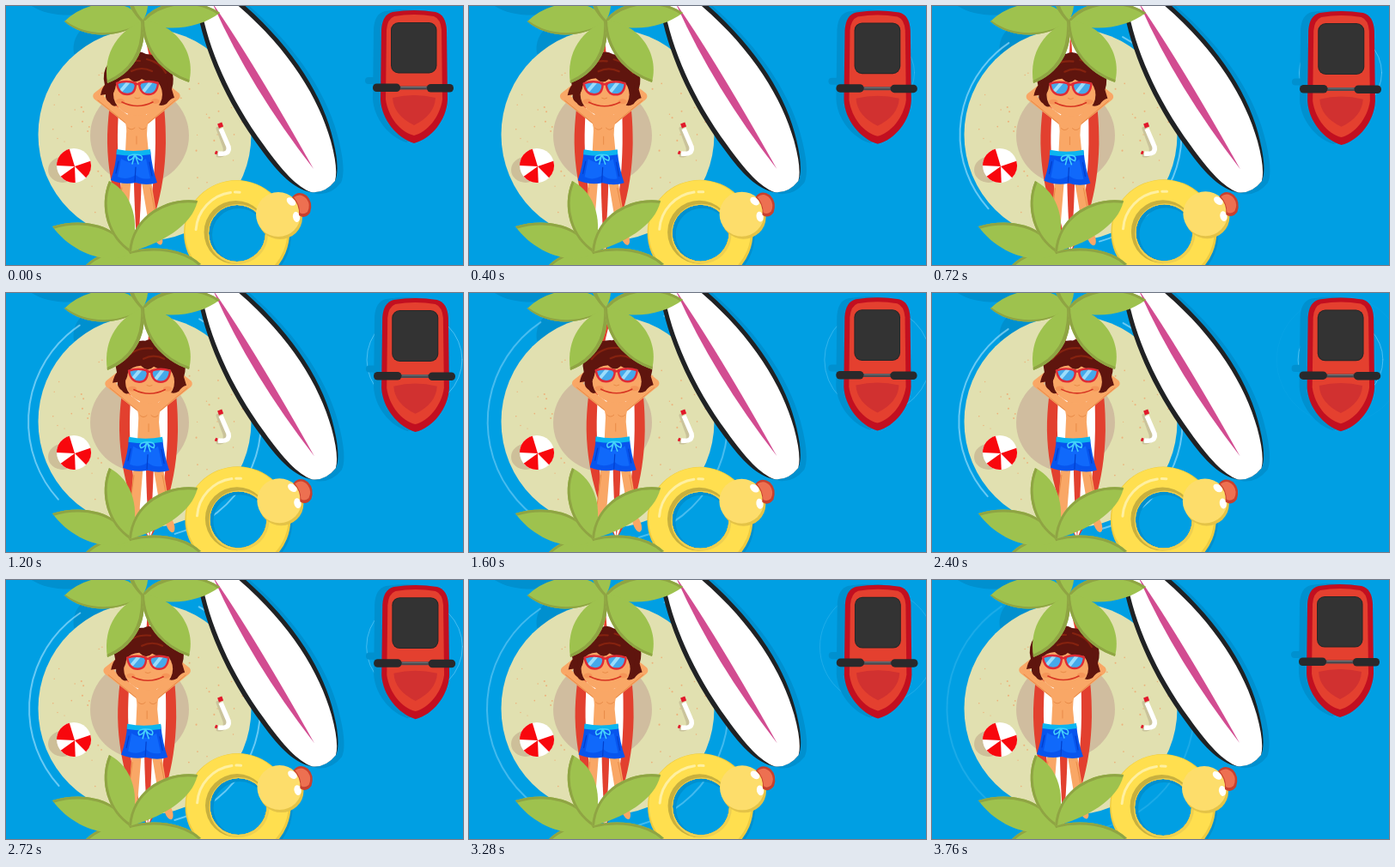
These frames come from a looping animation (532x302 px, 3.84 s). An HTML page with a canvas:

```html
<!DOCTYPE html>
<html lang="en">
<head>
<meta charset="utf-8">
<title>Beach island</title>
<style>
html, body { margin: 0; width: 100%; height: 100%; overflow: hidden; background: #009fe3; }
canvas { display: block; }
</style>
</head>
<body>
<canvas id="stage" width="532" height="302"></canvas>
<script>
const ctx = document.getElementById('stage').getContext('2d');
const LOOP = 3840, STEP = 80, RAD = Math.PI / 180;
const WATER = '#009fe3', SHADE = '#0090cf', SKIN = '#f9a766', SKIN_DARK = '#e88b48';
const LEAF = '#9ec24e', LEAF_DARK = '#8fa443';
const HAIR = '#5f150e', HAIR_LIGHT = '#85220f';
const clamp = v => Math.max(0, Math.min(1, v));

function shape(d, color) {
  ctx.fillStyle = color;
  ctx.fill(new Path2D(d));
}
function line(d, color, width, cap = 'round') {
  ctx.strokeStyle = color;
  ctx.lineWidth = width;
  ctx.lineCap = cap;
  ctx.lineJoin = 'round';
  ctx.stroke(new Path2D(d));
}
function oval(x, y, rx, ry, color, turn = 0) {
  ctx.fillStyle = color;
  ctx.beginPath();
  ctx.ellipse(x, y, rx, ry, turn, 0, 7);
  ctx.fill();
}
const disc = (x, y, r, color) => oval(x, y, r, r, color);
function box(x, y, w, h, r, color) {
  ctx.fillStyle = color;
  ctx.beginPath();
  ctx.roundRect(x, y, w, h, r);
  ctx.fill();
}
function arc(x, y, r, from, to, color, width) {
  ctx.strokeStyle = color;
  ctx.lineWidth = width;
  ctx.lineCap = 'round';
  ctx.beginPath();
  ctx.arc(x, y, r, from * RAD, to * RAD);
  ctx.stroke();
}
// A disc with an off-centre round hole.
function hoop(x, y, r, holeX, holeY, holeR, color) {
  ctx.fillStyle = color;
  ctx.beginPath();
  ctx.arc(x, y, r, 0, 2 * Math.PI);
  ctx.closePath();
  ctx.moveTo(holeX + holeR, holeY);
  ctx.arc(holeX, holeY, holeR, 0, 2 * Math.PI);
  ctx.fill('evenodd');
}
function at(dx, dy, draw) {
  ctx.save();
  ctx.translate(dx, dy);
  draw();
  ctx.restore();
}
function clipped(d, draw) {
  ctx.save();
  ctx.clip(new Path2D(d));
  draw();
  ctx.restore();
}

let seed = 11;
const random = () => (seed = seed * 16807 % 2147483647) / 2147483647;
const grains = Array.from({ length: 60 }, () => {
  const a = random() * 2 * Math.PI, r = 60 + 55 * random();
  return [161.5 + r * Math.cos(a), 150 + r * Math.sin(a), 0.6 + 0.5 * random()];
});

function islandRipple(age) {
  if (age < 400 || age > 2250) return;
  const u = (age - 560) / 560, r = 126.5 + 9 * u - u * u;
  ctx.globalAlpha = 0.62 * clamp((age - 400) / 250) * clamp((2500 - age) / 1300);
  arc(161.5, 150, r, age < 1400 ? 138 : 100, 236, '#a8e4ff', 2);
  arc(161.5, 150, r, -62, 75, '#a8e4ff', 2);
  ctx.globalAlpha = 1;
}
function boatRipple(r, alpha) {
  if (alpha <= 0 || r <= 0) return;
  ctx.globalAlpha = alpha;
  arc(475.5, 78, r, 0, 360, '#9adfff', 1);
  ctx.globalAlpha = 1;
}

function island() {
  disc(161.5, 150, 124, '#e1e0b0');
  for (const [x, y, r] of grains) disc(x, y, r, '#ecb27c');
  oval(155.5, 151, 57.5, 57, '#d0bd9f');
}

function ball() {
  oval(66, 191, 17, 15, '#cdbf99');
  disc(79, 186, 20, '#fff');
  ctx.fillStyle = '#f8070d';
  for (const [from, to] of [[-180, -105], [-15, 45], [85, 140]]) {
    ctx.beginPath();
    ctx.moveTo(80, 187);
    ctx.arc(79, 186, 20, from * RAD, to * RAD);
    ctx.fill();
  }
}

function snorkel() {
  line('M247 143L255 165Q257 174 247 174', '#cac39b', 5);
  line('M250 143L259 164Q261 174 247 172', '#fff', 5.5, 'butt');
  line('M248.7 136.500L250.500 141.500', '#e1192b', 5.5, 'butt');
  line('M243.500 170.500L246 171.500', '#e1192b', 4, 'butt');
}

function mat() {
  shape('M153 12C175 50 187 108 186 160C185 222 168 264 153 286C137 262 119 215 118 160C118 105 132 50 153 12Z', '#e2402f');
  shape('M153 12C170 50 175 108 174 160C173 222 163 264 153 286C142 262 131 215 130 160C130 105 137 50 153 12Z', '#fff');
  shape('M153 30C159 100 161 200 153 286C146 200 148 100 153 30Z', '#e2402f');
}

function legs() {
  line('M140 202L135 264', SKIN, 11);
  line('M163 202L172 256', SKIN, 11);
  oval(177, 269, 4.5, 10, SKIN, -0.35);
  line('M168 212L176 252M135 212L130 250', SKIN_DARK, 1);
}

function torso() {
  line('M143 134L106 105L120 94', SKIN, 9.5);
  line('M162 134L198 105L184 94', SKIN, 9.5);
  line('M140 137L107 110M165 137L197 110', SKIN_DARK, 1);
  shape('M144 122H161L166 133Q164 141 164 150L166 171H139L140 150Q141 141 138 133Z', SKIN);
  line('M142 142Q146 146 150 142M155 142Q159 146 163 142M152 152V161', SKIN_DARK, 1);
}

function shorts() {
  shape('M129 168Q148 172 168 168Q170 189 176 206Q164 210 151 206Q136 209 122 203Q128 186 129 168Z', '#0755ee');
  shape('M134 178Q150 188 163 178L168 201Q158 203 151 197Q140 204 130 199Z', '#1069fb');
  line('M151 188L150 205M131 181L128 195M167 182L170 198', '#033fca', 1.2);
  shape('M129 167Q148 171 168 167L168.500 173Q148 176 128.500 173Z', '#0cb5ef');
  line('M150 173Q139 174 143 180Q148 179 150 173Q161 173 158 180Q153 179 150 173L147 184M150 173L154 184', '#45d2fa', 1.5);
}

function head() {
  shape('M110 104Q112 95 115 92Q111 77 120 66Q131 54 148 55Q155 51 163 56Q183 57 192 73Q197 85 193 97L196 107Q191 108 187 114Q180 118 176 114H132Q126 120 121 113Q115 109 116 103Z', HAIR);
  oval(153.5, 103, 28.500, 25, SKIN);
  shape('M122 103Q116 80 133 68Q165 60 184 76Q190 89 186 104Q181 94 179 88Q168 91 158 85Q151 92 143 84Q132 85 128 91Q127 102 122 103Z', HAIR);
  line('M124 77Q136 62 156 64M164 62Q180 66 186 78M146 76Q158 70 170 76', HAIR_LIGHT, 2.2);
  oval(133, 111, 5, 3, '#f59558');
  oval(174, 111, 5, 3, '#f59558');
  line('M135 112Q153 121 171 112', '#d73522', 1.6);
  line('M150 107Q153 109 156 107', SKIN_DARK, 1);

  const lenses = 'M129 90Q140 86 151 90Q151 103 141 103Q131 103 129 90ZM155 90Q166 86 177 90Q176 103 166 103Q156 103 155 90Z';
  shape(lenses, '#45a9ea');
  clipped(lenses, () => line('M132 101L144 87M159 101L170 87', '#9bdcfb', 4));
  line(lenses, '#df2b36', 2.4);
  line('M150 91H156', '#df2b36', 2.5);
}

function boy() {
  mat();
  legs();
  torso();
  shorts();
  head();
}

function surfboard() {
  const body = 'M221 -4C229 48 254 109 296 166C319 198 336 213 354 217Q371 219 383 204Q389 191 381 157C370 106 334 48 274 -4Z';
  at(7, 2, () => shape(body, SHADE));
  shape(body, '#202224');
  shape('M226 -4C234 46 259 106 300 162C322 193 339 211 355 217Q371 219 383 204Q387 190 378 157C364 107 329 49 266 -4Z', '#fff');
  shape('M240 -4Q286 62 358 190Q283 93 240 -4Z', '#d24c91');
}

function swimRing() {
  hoop(271, 267, 61, 271, 267, 31, SHADE);
  hoop(268.5, 264.5, 61.5, 269, 265, 33, '#eecb40');
  hoop(268, 263, 59.5, 269, 265, 33, '#ffdf4f');
  arc(268, 264, 47, 184, 262, '#fff0a0', 3);
  arc(268, 264, 47, 268, 275, '#fff0a0', 3);
  hoop(267.5, 264, 37, 269, 265, 33, '#c8b03e');
  hoop(270, 266, 35, 269, 265, 33, '#efd050');
  oval(319, 247, 26, 25, '#e4c347');
  disc(317, 243, 26, '#fddd6b');
  oval(332, 228, 4, 6, '#fff', -0.9);
  oval(338, 246, 4, 6, '#fff', -0.2);
  shape('M333 223Q340 214 350 221Q358 229 354 241Q348 249 341 244Q342 231 333 223Z', '#c8402e');
  shape('M335 223Q343 217 350 225Q355 232 351 240Q346 244 342 241Q342 231 335 223Z', '#ed7051');
}

function boat() {
  const hull = 'M437 28Q438 10 450 7Q475 3 500 7Q512 10 513 28L514 109C513 133 495 155 475 160C455 154 437 132 436 109Z';
  at(-9, -1, () => shape(hull, SHADE));
  box(418, 83, 20, 8, 4, SHADE);
  shape(hull, '#c20f20');
  shape('M443 28Q444 15 452 12Q475 8 498 12Q506 15 507 28L508 109C505 130 490 147 475 151C459 147 445 130 442 109Z', '#e4402f');
  box(448, 19, 53.5, 59.5, 9, '#272727');
  box(449, 20, 51.5, 57.5, 8, '#333');
  shape('M450 107Q475 101 500 107Q499 127 475 139Q451 127 450 107Z', '#d13130');
  line('M455 95.500H494', '#4b4b50', 4);
  line('M460 94.500H489', '#77777b', 1);
  box(427, 90.5, 32, 9.5, 4.5, '#29292b');
  box(490, 91, 31, 9.5, 4.5, '#29292b');
}

function leaf(d, rib) {
  shape(d, LEAF);
  clipped(d, () => line(rib, LEAF_DARK, 6));
}

function topPalm() {
  leaf('M160 18C143 -12 94 -8 68 18C92 39 133 38 160 18Z', 'M68 20C95 40 136 38 160 20');
  leaf('M158 19C137 -2 139 -17 150 -28C168 -17 169 3 158 19Z', 'M150 -28C140 -12 144 5 158 19');
  leaf('M158 18C176 -9 222 -11 249 8C224 27 185 31 158 18Z', 'M160 15C181 -7 222 -11 249 8');
  leaf('M160 17C133 27 112 53 118 90C147 79 165 52 160 17Z', 'M160 17C162 54 146 78 118 90');
  leaf('M158 17C190 17 223 49 213 89C181 78 158 51 158 17Z', 'M158 17C159 52 181 78 213 89');
}

function bottomPalm() {
  leaf('M145 284C116 296 108 312 120 334H168C178 312 170 296 145 284Z', 'M145 284C116 296 108 312 120 334');
  leaf('M146 286C117 321 92 319 79 330C84 299 114 281 146 286Z', 'M146 286C114 281 84 299 79 330');
  leaf('M143 286C172 279 207 282 227 301C197 313 162 309 143 286Z', 'M143 286C172 279 207 282 227 301');
  leaf('M147 288C121 304 77 289 54 257C91 246 130 255 147 288Z', 'M54 257C91 246 130 255 147 288');
  leaf('M144 287C119 271 107 235 120 204C147 217 158 254 144 287Z', 'M120 204C107 235 119 271 144 287');
  leaf('M143 287C146 245 186 222 223 227C217 257 178 278 143 287Z', 'M143 287C146 245 186 222 223 227');
}

function render(t) {
  const bob = (1 - Math.cos(2 * Math.PI * t / 1920)) / 2;
  const phase = (t + 40) % LOOP / 1920;
  const slide = 22.5 * (phase < 1 ? phase : 2 - phase) - 0.5;

  ctx.fillStyle = WATER;
  ctx.fillRect(0, 0, 532, 302);
  shape('M30 0Q50 13 86 10L130 0Z', SHADE);
  shape('M92 24Q76 36 79 56L118 48V24Z', SHADE);

  islandRipple(t);
  islandRipple(t - 1600);
  boatRipple(48 + 0.0155 * (t - 720), 0.5 * clamp((t - 150) / 500) * clamp((2500 - t) / 1300));
  boatRipple(43 + 0.02 * (t - 2080), 0.5 * clamp((t - 1750) / 400) * clamp((3720 - t) / 1100));

  island();
  ball();
  snorkel();
  at(slide, bob * 0.8, boy);
  at(bob, bob * 0.3, surfboard);
  at(bob * 1.6, -bob, swimRing);
  at(475 + bob * 1.8, 80 + bob * 1.7, () => {
    ctx.scale(1 + bob * 0.012, 1 + bob * 0.008);
    ctx.translate(-475, -80);
    boat();
  });
  topPalm();
  bottomPalm();
}

function tick() {
  const t = performance.now() % LOOP;
  render(Math.floor(t / STEP) * STEP);
  requestAnimationFrame(tick);
}
tick();
</script>
</body>
</html>
```
